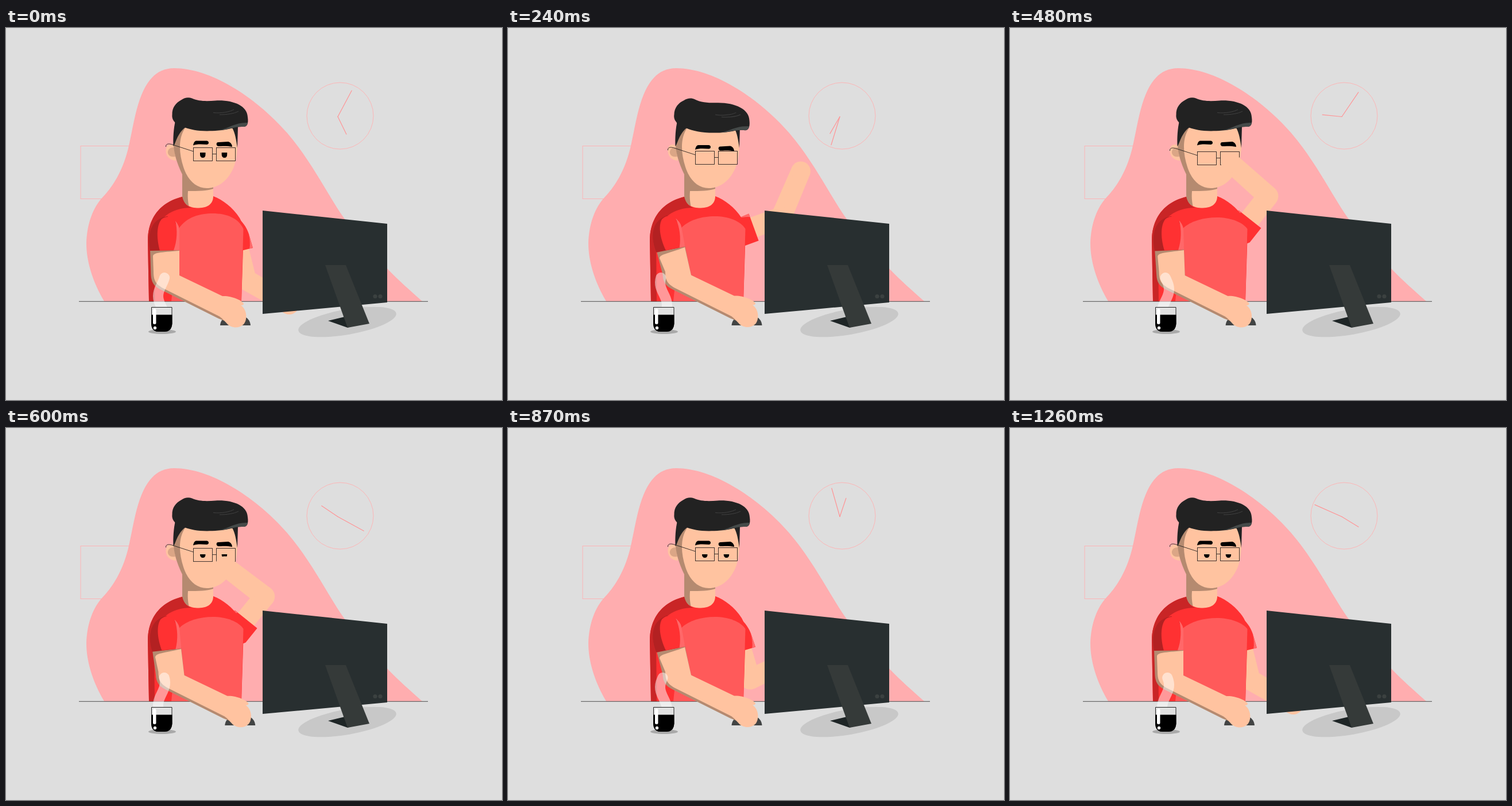
An HTML page for the animation above (1320 ms loop, 864 px wide and 648 px high).

```html
<!DOCTYPE html>
<html lang="en">
<head>
<meta charset="utf-8">
<title>At the desk</title>
<style>
  html, body { margin: 0; width: 100%; height: 100%; overflow: hidden; background: #dedede; }
  svg { display: block; width: 100vw; height: 100vh; }
  .skin { fill: #ffc3a0; }
  .shade { fill: #b58a70; }
  .red { fill: #ff3132; }
  .rose { fill: #ff5a5a; }
  .hair { fill: #222; }
  .thin { fill: none; stroke: #ffb0b2; stroke-width: .9; }
  .hand { stroke: #ff9496; stroke-width: 1.2; stroke-linecap: round; }
  .frame { fill: none; stroke: #2a2422; stroke-width: .9; }
</style>
</head>
<body>
<svg viewBox="0 0 864 648">
  <defs>
    <clipPath id="lid"><rect id="lidBox" x="320" y="216" width="90" height="20"/></clipPath>
    <clipPath id="rim"><rect x="230" y="410" width="90" height="76"/></clipPath>
  </defs>
  <rect width="864" height="648" fill="#dedede"/>

  <!-- wall -->
  <rect class="thin" x="130" y="205.5" width="110" height="92"/>
  <circle class="thin" cx="582" cy="153" r="58"/>
  <path fill="#ffadaf" d="M171 476C150 440 140 405 140 375C141 340 152 312 169 294C188 274 205 245 214 205C226 155 232 70 293 70C355 70 433 118 490 183C532 232 560 290 588 330C615 365 640 398 664 419C684 440 705 458 725 476Z"/>
  <line class="hand" id="hour" x1="578" y1="154.500" x2="578" y2="120.500"/>
  <line class="hand" id="minute" x1="578" y1="154.500" x2="578" y2="103"/>
  <path d="M127 476.300H735" stroke="#6a6a6a" stroke-width="1.2"/>

  <!-- head -->
  <path class="skin" d="M280 207C276 216 280 230 296 231L294 205C289 202 282 202 280 207Z"/>
  <path fill="#dba686" d="M293 208C285 207 281 213 282 218C284 224 289 225 295 224Z"/>
  <path class="shade" d="M307 250L307 320H361V277Z"/>
  <path class="skin" d="M317 284C335 284 350 284 361 280V322H322C317 308 316 296 317 284Z"/>
  <path class="shade" d="M302 168H350V280C330 280 316 270 307 255C297 235 292 215 292 202Z"/>
  <path class="skin" d="M316 168H400C405 195 404 220 398 239C390 262 372 279 350 279C330 279 316 264 309 242C301 217 300 192 312 174Z"/>
  <path class="hair" d="M295 162C292 175 291 190 291.500 206C295 204 298 182 314 172L322 162Z"/>
  <path class="hair" d="M390 170L404 172L403 209C401 195 399 182 394 174Z"/>
  <g id="hairTop">
    <path class="hair" d="M289.500 151C289 139 296 130 305 125.500C311 121 318 120 324 122.500C336 128 350 127.500 365 126.500C395 125 420 135 421 155C423 168 419 172 414 172C400 171 390 177 370 178.500C340 181 325 178 312 173.500C300 171 296 168 294 164C290 160 289 155 289.500 151Z"/>
    <path fill="#454a49" d="M371 178C390 174 400 164 421 165C420 170 418 172 414 172C398 171 390 177 371 178Z"/>
    <path fill="none" stroke="#414141" stroke-width="1" d="M361 147.500C375 149 390 146 397 142M372 151C385 151 398 149 405 145"/>
  </g>
  <g id="brows">
    <path d="M326 204.500C327 199 329 196.500 332 196.500L350 196.500C354 197.500 354 202.500 350 203C340 202.500 332 202 326 204.500Z"/>
    <path d="M367 204C366 200 368 199 370 199L387 198C392 199 394 204 394 207C385 205 375 206 369 206Z"/>
  </g>
  <g clip-path="url(#lid)">
    <path id="eye" d="M338 217H347.500V220C347.500 224 346 226 343 226C340 226 338 224 338 220Z"/>
    <use href="#eye" x="37.700"/>
  </g>
  <g id="glasses" class="frame">
    <rect x="326.500" y="208.500" width="33" height="23"/>
    <rect x="366.500" y="208.500" width="33" height="23"/>
    <path d="M359.500 219.500H366.500M278.500 207C278 201 284 201 291 203.500L326.500 215"/>
  </g>

  <!-- far arm -->
  <path id="upper" class="skin"/>
  <path id="fore" class="skin"/>
  <circle id="elbow" class="skin" r="18"/>
  <circle id="palm" class="skin" r="17"/>
  <g id="farSleeve">
    <path class="red" d="M32 -25L6 -24C-5 -23 -20 -18 -26 -10V10L0 25H32Z"/>
    <path fill="#ff6a6b" d="M32 -25L6 -24Q22 -23.500 32 -19Z"/>
  </g>

  <!-- torso -->
  <path class="red" d="M249 476L247 370C247 330 270 303 307 294C309 308 320 313.500 336 313.500C352 313 361 306 361 293C377 299 395 312 407 331C411 338 413 345 414 352L410 476Z"/>
  <path fill="#c92526" d="M249 476L247 370C247 330 270 303 307 294C310 306 316 311 323 313C290 313 262 330 258 365L259 476Z"/>
  <path id="panel" class="rose"/>

  <!-- near arm -->
  <path id="mouse" fill="#424444" d="M373 518C374 506 384 500 400 500C416 500 425 506 426 518Z"/>
  <path id="armShade" class="shade"/>
  <path id="arm" class="skin"/>
  <g id="sleeve">
    <path fill="#b32122" d="M251 388C246 362 250 333 281 328L296 340L302 387Z"/>
    <path class="red" d="M268 387.500C263 370 261 345 271 333C279 327 290 327 294 337L300 350L298 387Z"/>
    <path fill="#ff6869" d="M295 336C299 341 302 346 302 352V387L292 387.300C298 371 299 352 295 336Z"/>
  </g>

  <!-- cup -->
  <ellipse cx="272" cy="529" rx="24" ry="4" fill="#a9a9a9"/>
  <path id="steam" clip-path="url(#rim)" fill="none" stroke="#fff" stroke-opacity=".5" stroke-width="18" stroke-linecap="round" stroke-linejoin="round"/>
  <path fill="#e1e1e1" stroke="#222" d="M253.500 486.500H289V515Q288 528.500 276 528.500H266Q254 528.500 253.500 515Z"/>
  <path d="M253 499.500H289.500V515Q288.500 529 276 529H266Q253.500 529 253 515Z"/>
  <rect x="256" y="489" width="5.500" height="27" rx="2.500" fill="#fff"/>
  <circle cx="259.500" cy="522.500" r="2.700" fill="#fff"/>

  <!-- monitor -->
  <ellipse cx="594.500" cy="512" rx="86.500" ry="22" transform="rotate(-10 594.500 512)" fill="#c8c8c8"/>
  <path fill="#282f30" d="M447 318L664 341V478L447 498Z"/>
  <path fill="#1e2526" d="M561 510L590 503L604 518L595 522Z"/>
  <path fill="#353a39" d="M556 413H592L633 515L595 522Z"/>
  <g fill="#3b4140"><circle cx="643" cy="467.500" r="3.600"/><circle cx="652" cy="467.500" r="3.600"/></g>
</svg>
<script>
const $ = id => document.getElementById(id);
const set = (id, attrs) => { for (const k in attrs) $(id).setAttribute(k, attrs[k]); };
const LOOP = 1320, TAU = Math.PI * 2, RAD = Math.PI / 180;

// Smooth curve through [step, value] keys that never overshoots them.
function track(...keys) {
  const sec = keys.slice(1).map((k, i) => (k[1] - keys[i][1]) / (k[0] - keys[i][0]));
  const slope = keys.map((_, i) => {
    const a = sec[i - 1], b = sec[i];
    return a * b > 0 ? 2 * a * b / (a + b) : 0;
  });
  return x => {
    let i = 0;
    while (i < sec.length - 1 && x > keys[i + 1][0]) i++;
    const [x0, y0] = keys[i], [x1, y1] = keys[i + 1];
    const h = x1 - x0, u = Math.min(1, Math.max(0, (x - x0) / h)), v = 1 - u;
    return y0 * v * v * (1 + 2 * u) + y1 * u * u * (3 - 2 * u)
      + h * u * v * (slope[i] * v - slope[i + 1] * u);
  };
}

const upperTurn = track([0, 76], [6, -20], [10, -48], [14, -52], [16, -51], [20, 33], [25, 76], [35, 76]);
const foreTurn = track([0, 30], [6, -67], [10, -92], [14, -145], [16, -142.5], [20, -60], [28, 0], [34, 30], [35, 30]);
const slide = track([0, 0], [6, 1], [10, 0], [22, 1], [28, 1], [35, 0]);
const frown = track([0, 0], [6, 1], [10, .08], [12, 0]);
const slip = track([0, 0], [6, 6], [10, 7], [13, 7], [17, 0]);
const lid = track([0, 216], [4, 227], [12, 227], [16, 220], [35, 220]);
const chest = track([0, 323], [6, 328], [10, 331], [16, 329], [28, 329], [35, 331]);

const SHOULDER = [398, 358];
const polar = (p, len, deg) => [p[0] + len * Math.cos(deg * RAD), p[1] + len * Math.sin(deg * RAD)];

function limb(id, a, ra, b, rb, deg) {
  const pts = [polar(a, ra, deg - 90), polar(b, rb, deg - 90), polar(b, rb, deg + 90), polar(a, ra, deg + 90)];
  set(id, { d: 'M' + pts.join('L') + 'Z' });
}

function farArm(s) {
  const up = upperTurn(s), fore = foreTurn(s);
  const elbow = polar(SHOULDER, 83, up), palm = polar(elbow, 87, fore);
  limb('upper', SHOULDER, 18, elbow, 18, up);
  limb('fore', elbow, 18, palm, 17, fore);
  set('elbow', { cx: elbow[0], cy: elbow[1] });
  set('palm', { cx: palm[0], cy: palm[1] });
  set('farSleeve', { transform: `translate(${SHOULDER}) rotate(${up})` });
}

// The forearm slides with the mouse while the cuff swings with the sleeve.
function nearArm(k) {
  const f = (x, y) => `${x + 17 * k} ${y - .5 * k} `;
  const l = (x, y) => `${x + 8 * k} ${y + 3 * k} `;
  const r = (x, y) => `${x + 6 * k} ${y - 6 * k} `;
  set('mouse', { transform: `translate(${16.5 * k} 0)` });
  set('sleeve', { transform: `rotate(${-10.5 * k} 271 349)` });
  set('armShade', { d: `M${l(251, 386)}L${r(302, 385)}L${f(302, 431)}L${f(385, 475)}L${f(385, 512)}`
    + `L${f(370, 506)}L${f(269, 455.5)}C${f(258, 450)}${f(253, 443)}${f(252.5, 430)}Z` });
  set('arm', { d: `M${l(256, 398)}C${l(256.5, 391)}${l(268, 391)}${r(302, 388)}L${f(302, 431)}L${f(377, 467)}`
    + `C${f(392, 466)}${f(411, 474)}${f(414, 480)}C${f(414, 483)}${f(411, 483)}${f(409, 483)}`
    + `C${f(420, 490)}${f(421, 508)}${f(414, 516)}C${f(405, 525)}${f(391, 522)}${f(385, 515)}`
    + `C${f(380, 510)}${f(376, 504)}${f(369, 501)}L${f(275, 454)}C${f(262, 447)}${f(257, 441)}${f(257, 425)}Z` });
}

function steam(s) {
  const pts = [];
  for (let y = 435; y <= 491; y += 4)
    pts.push([271 + 6 * Math.cos(TAU * ((y - 428) / 78 + s / 20)), y]);
  set('steam', { d: 'M' + pts.join('L') });
}

function draw(ms) {
  // five steps per 180 ms, the first one held twice as long
  const t = ms % LOOP, rest = t % 180;
  const s = Math.floor(t / 180) * 5 + (rest < 60 ? 0 : Math.floor(rest / 30) - 1);
  const fr = frown(s), top = chest(s);
  set('minute', { transform: `rotate(${28 + 28.17 * s} 578 154.5)` });
  set('hour', { transform: `rotate(${154 + 9.36 * s} 578 154.5)` });
  set('hairTop', { transform: `rotate(${2.9 * fr} 292 150)` });
  set('brows', { transform: `translate(0 ${7.5 * fr})` });
  set('glasses', { transform: `translate(0 ${slip(s)})` });
  set('lidBox', { y: lid(s) });
  set('panel', { d: `M288 476L301 349C315 ${top + 6} 338 ${top} 360 ${top}C384 ${top} 405 ${top + 8} 413.500 350L410 476Z` });
  farArm(s);
  nearArm(slide(s));
  steam(s);
}

let start;
function tick(now) {
  start ??= now;
  draw(now - start);
  requestAnimationFrame(tick);
}
draw(0);
requestAnimationFrame(tick);
</script>
</body>
</html>
```
